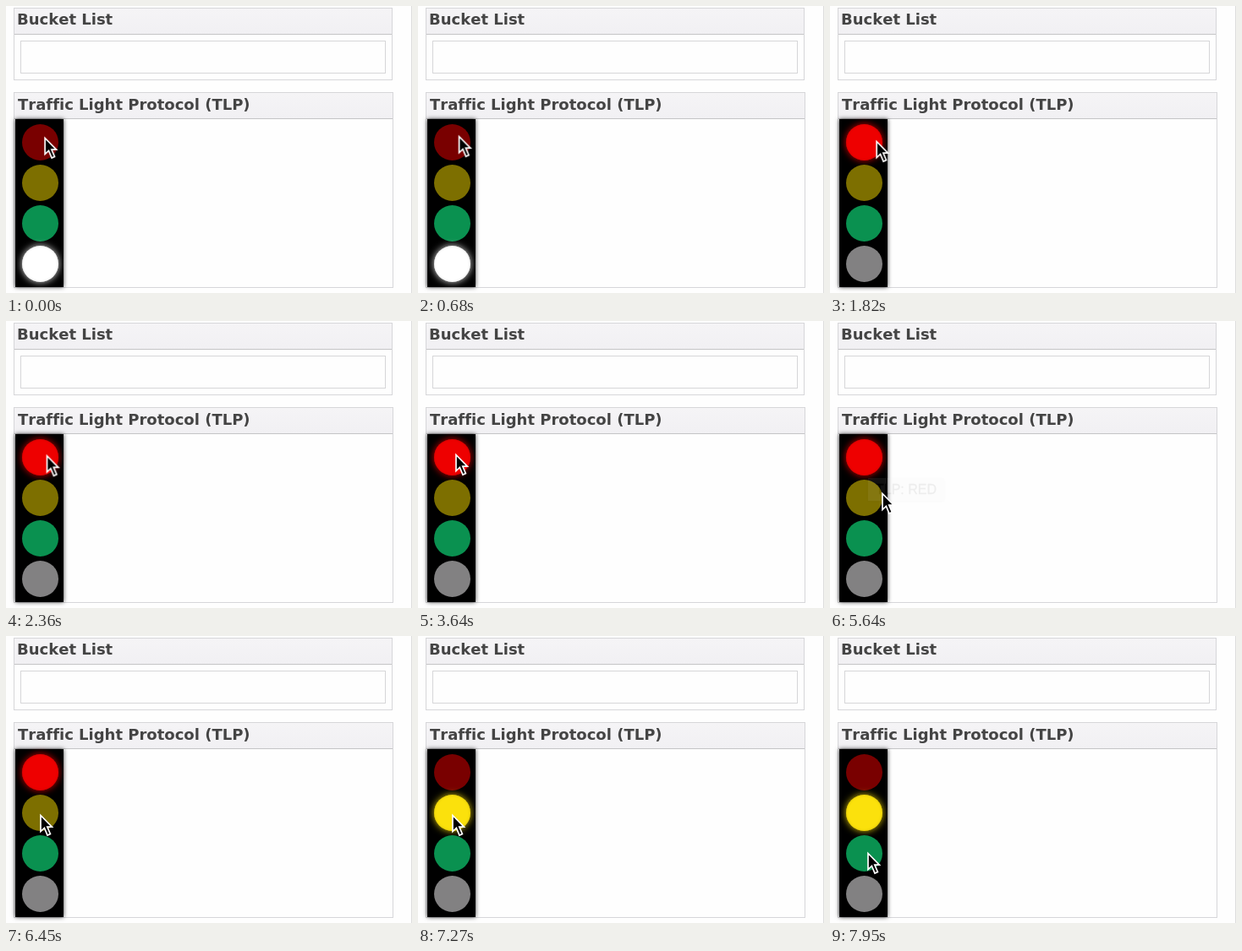
Write an HTML page that moves like this. It is 480x340 px and loops after 8000 ms.

```html
<!DOCTYPE html>
<html lang="en">
<head>
<meta charset="utf-8">
<title>Traffic Light Protocol</title>
<style>
html, body { margin: 0; width: 100%; height: 100%; overflow: hidden; background: #fefefe; }
#stage { position: relative; width: 480px; height: 340px; overflow: hidden; background: #fefefe; }
#stage * { position: absolute; box-sizing: border-box; }
.edge { right: 0; top: 0; width: 1px; height: 340px; background: #ddd; }
.box { left: 9px; width: 449px; border: 1px solid #d6d6d9; }
.head {
  left: 0; right: 0; top: 0; height: 31px; padding-left: 3px;
  border-bottom: 1px solid #c4c4c6;
  background: linear-gradient(#f5f4f6, #f1f0f3);
  font: bold 18px/26px "DejaVu Sans", Verdana, sans-serif;
  font-kerning: none; font-variant-ligatures: none;
  color: #444; white-space: nowrap;
}
.field { left: 7px; top: 38px; width: 432px; height: 39px; border: 1px solid #d6d6d8; }
.panel { left: 11px; top: 134px; width: 57px; height: 199px; background: #000; box-shadow: 0 0 5px rgba(0,0,0,.75); }
.lamp { left: 7.5px; width: 43px; height: 43px; border-radius: 50%; }
.tip {
  left: 45px; top: 186px; width: 90px; height: 27px; padding-left: 9px;
  background: #ececec; box-shadow: 0 1px 3px rgba(0,0,0,.35);
  font: 16px/28px "Liberation Sans", Arial, sans-serif; color: #111;
  -webkit-text-stroke: .3px #111; white-space: nowrap;
}
.cursor { left: -1px; top: -.5px; width: 22px; height: 32px; overflow: visible; }
</style>
</head>
<body>
<div id="stage">
  <div class="edge"></div>
  <div class="box" style="top:2px;height:86px;width:448px">
    <div class="head">Bucket List</div>
    <div class="field"></div>
  </div>
  <div class="box" style="top:102px;height:232px">
    <div class="head" style="padding-left:4px;line-height:27px">Traffic Light Protocol (TLP)</div>
  </div>
  <div class="panel">
    <div class="lamp" id="red" style="top:5.7px"></div>
    <div class="lamp" id="amber" style="top:53.9px"></div>
    <div class="lamp" id="green" style="top:102.1px"></div>
    <div class="lamp" id="white" style="top:150.3px"></div>
  </div>
  <div class="tip" id="tip">TLP: RED</div>
  <svg class="cursor" id="cursor">
    <path d="M1 1.5V20.5L5.4 16.4L9 25L12.4 23.5L8.8 15.2H14.4Z"
      fill="#000" stroke="#fff" stroke-width="1.7" stroke-linejoin="miter"/>
  </svg>
</div>
<script>
const LOOP = 8000;
const $ = id => document.getElementById(id);

// Each row is [ms, value, easing]; the last value holds to the end.
function play(id, rows, style, ease) {
  const frames = rows.map(([ms, value, easing]) =>
    ({ offset: ms / LOOP, easing: easing || ease, ...style(value) }));
  frames.push({ ...frames[frames.length - 1], offset: 1 });
  const anim = $(id).animate(frames, { duration: LOOP, iterations: Infinity });
  anim.startTime = document.timeline.currentTime;
}

const off = color => ({ backgroundColor: color, boxShadow: "none" });
const lit = (color, glow) =>
  ({ backgroundColor: color, boxShadow: `0 0 8px ${glow}, inset 0 0 3px ${glow}` });
const same = v => v;

play("red", [[0, off("#790000")], [1540, lit("#ee0000", "#d00000")], [7050, off("#790000")]], same, "step-end");
play("amber", [[0, off("#7d6f00")], [7050, lit("#fbe10c", "#d6c00a")]], same, "step-end");
play("green", [[0, off("#0a9150")]], same, "step-end");
play("white", [[0, lit("#ffffff", "#dddddd")], [1540, off("#828182")]], same, "step-end");

play("tip", [
  [0, 0, "step-end"], [3720, 0], [3800, 1], [5080, 1], [5400, .35], [5640, .07], [5800, 0]
], v => ({ opacity: v }), "linear");

play("cursor", [
  [0, [46, 155]], [50, [46, 155], "ease-in"],
  [270, [60, 141]], [390, [69, 131], "ease-in-out"], [770, [46, 156]],
  [1050, [46, 156]], [1140, [45, 157]],
  [1620, [45, 157], "ease-in"], [1820, [55, 159]],
  [1980, [83, 165], "ease-in-out"], [2270, [53, 160], "ease-out"],
  [2500, [45, 157]], [3640, [45, 157]], [3720, [45, 158]],
  [5100, [45, 158], "ease-in"], [5270, [51, 162]], [5450, [60, 183], "ease-out"],
  [5640, [62, 203], "ease-in-out"], [6090, [52, 210], "ease-out"],
  [6450, [41, 211]], [7550, [41, 211], "ease-in-out"], [7950, [45, 256]]
], ([x, y]) => ({ transform: `translate(${x}px, ${y}px)` }), "linear");
</script>
</body>
</html>
```
